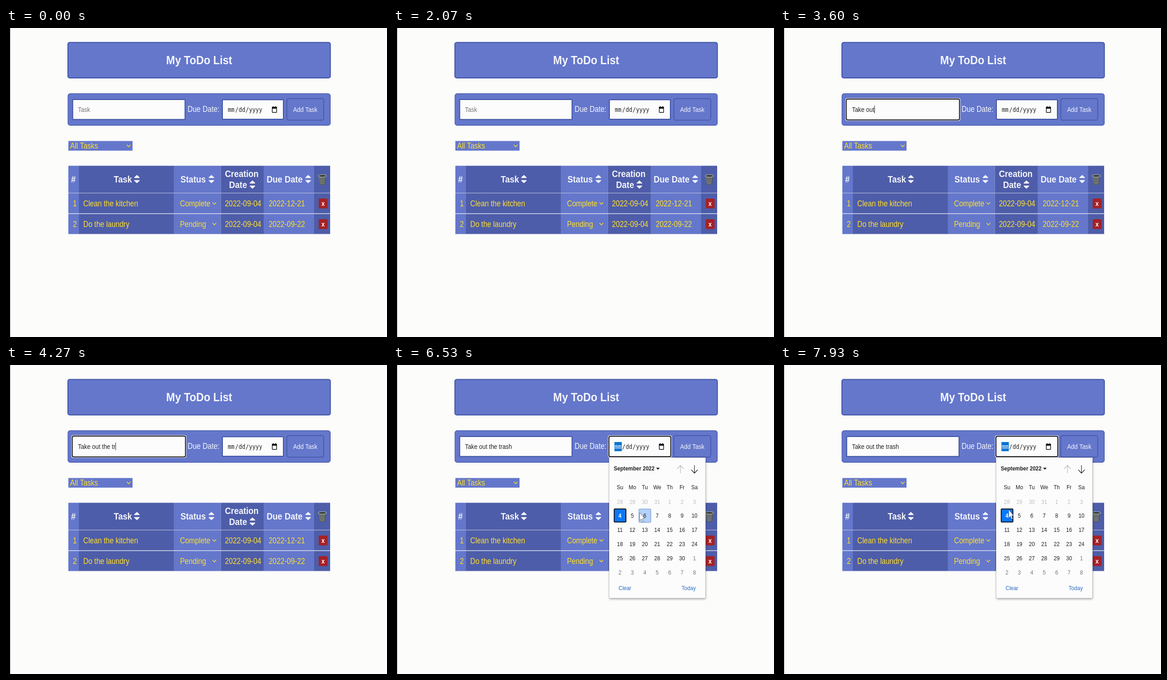
Animation of 831 by 674 pixels, one loop 8000 ms. Source, as an HTML page with a canvas:

```html
<!DOCTYPE html>
<html lang="en">
<head>
<meta charset="utf-8">
<title>My ToDo List</title>
<style>
html, body { margin: 0; width: 100%; height: 100%; overflow: hidden; background: #fcfcfb; }
canvas { display: block; }
</style>
</head>
<body>
<canvas id="stage" width="831" height="674"></canvas>
<script>
const ctx = document.getElementById('stage').getContext('2d');
const LOOP = 8000, SX = 0.967, SY = 1.1; // the page is shown slightly narrow
const LIGHT = '#6477cb', DARK = '#4e5da9', EDGE = '#3f52a5', GOLD = '#ffdf2c', INK = '#202020';
const SANS = '"Liberation Sans", Arial, sans-serif';
const MONO = '"DejaVu Sans Mono", monospace';

const TASK = 'Take out the trash';
const KEYS = [2600, 2730, 2930, 3060, 3130, 3330, 3430, 3530, 3630, 3760,
  3870, 3960, 4060, 4130, 4270, 4400, 4470, 4600];
const FOCUS = 2470, SHOW_CURSOR = 5400, OPEN = 5930;
const PATH = [[5400, 520, 232], [5600, 541, 190], [5860, 586, 178], [6270, 586, 178],
  [6530, 538, 322], [6870, 553, 348], [7200, 530, 345], [7600, 512, 326], [7900, 499, 316]];

function text(s, x, y, size, color, { bold, align = 'left', font = SANS } = {}) {
  ctx.save();
  ctx.translate(x, y);
  ctx.scale(SX, SY);
  ctx.font = `${bold ? 'bold ' : ''}${size}px ${font}`;
  ctx.textAlign = align;
  ctx.fillStyle = color;
  ctx.fillText(s, 0, 0);
  const width = ctx.measureText(s).width * SX;
  ctx.restore();
  return width;
}

function rect(x, y, r, b, color) {
  ctx.fillStyle = color;
  ctx.fillRect(x, y, r - x, b - y);
}

// Rounded box with its border drawn inside the given edges
function box(x, y, r, b, radius, fill, edge, line = 0) {
  const h = line / 2;
  ctx.beginPath();
  ctx.roundRect(x + h, y + h, r - x - line, b - y - line, radius);
  ctx.fillStyle = fill;
  ctx.fill();
  if (line) {
    ctx.strokeStyle = edge;
    ctx.lineWidth = line;
    ctx.stroke();
  }
}

function shape(points, fill) {
  ctx.beginPath();
  points.forEach(([x, y]) => ctx.lineTo(x, y));
  ctx.closePath();
  ctx.fillStyle = fill;
  ctx.fill();
}

function lines(color, width, ...paths) {
  ctx.strokeStyle = color;
  ctx.lineWidth = width;
  ctx.beginPath();
  for (const p of paths) p.forEach(([x, y], i) => i ? ctx.lineTo(x, y) : ctx.moveTo(x, y));
  ctx.stroke();
}

const chevron = (x, y) => lines(GOLD, 1.4, [[x - 4, y - 2.3], [x, y + 2.3], [x + 4, y - 2.3]]);

function sortIcon(x, y) {
  for (const d of [-1, 1])
    shape([[x - 6, y + 2.3 * d], [x + 6, y + 2.3 * d], [x + 5.5, y + 4 * d],
      [x, y + 9 * d], [x - 5.5, y + 4 * d]], '#f4f5fb');
}

function trashCan() {
  shape([[681.5, 323], [698.5, 323], [695.5, 342], [684.5, 342]], '#4b504f');
  const mesh = [];
  for (let i = 0; i < 5; i++) {
    mesh.push([[682.5 + i * 3, 325], [685.5 + i * 2, 341]]);
    mesh.push([[683 + i / 2, 327 + i * 3.2], [697 - i / 2, 327 + i * 3.2]]);
  }
  lines('#8b9290', 0.8, ...mesh);
  ctx.beginPath();
  ctx.ellipse(690, 322.5, 9, 2.7, 0, 0, 7);
  ctx.fillStyle = '#343938';
  ctx.fill();
  ctx.strokeStyle = '#a4aaa8';
  ctx.lineWidth = 1.3;
  ctx.stroke();
}

function inputBox(x, y, r, b, focused) {
  if (focused) {
    box(x - 3, y - 3, r + 3, b + 3, 4, '#f8f9ff');
    box(x - 2, y - 2, r + 2, b + 2, 3, '#fcfcfc', '#101010', 2);
  } else box(x - 1, y - 1, r + 1, b + 1, 1, '#fcfcfc', EDGE, 2);
}

function form(t) {
  box(134.5, 142.5, 708, 213, 5, LIGHT, EDGE, 1.2);
  const typing = t >= FOCUS && t < OPEN;
  inputBox(145.5, 156, 390.5, 199.5, typing);
  const typed = TASK.slice(0, KEYS.filter(k => k <= t).length);
  const w = text(typed || 'Task', 157, 182.5, 13.333, typed ? INK : '#757575');
  if (typing && !(t >= 5100 && t < 5600)) rect(157 + (typed ? w : 0), 169, 158 + (typed ? w : 0), 186, '#222');

  text('Due Date:', 396, 182.5, 16, '#f4f5fb');
  inputBox(472, 156.5, 605, 199, t >= OPEN);
  if (t >= OPEN) rect(483, 168, 499, 188, '#0874d1');
  const part = (s, x, color = INK) => text(s, x, 183, 12.4, color, { font: MONO });
  part('mm', 483.7, t >= OPEN ? '#fff' : INK);
  part('/', 499.8);
  part('dd', 507.5);
  part('/', 522.5);
  part('yyyy', 530);
  box(580, 172, 591, 185, 1, '#fcfcfc', '#111', 1.4);
  rect(580, 172, 591, 176, '#111');
  rect(582, 170.5, 583.5, 173, '#111');
  rect(587.5, 170.5, 589, 173, '#111');

  box(611.5, 153, 694, 202, 4, LIGHT, '#4a5cac', 2);
  text('Add Task', 652.7, 182.5, 13.333, '#f4f5fb', { align: 'center' });
}

function table() {
  const cols = [136, 159, 366, 468.5, 562, 672, 707];
  for (let i = 0; i < 6; i++) rect(cols[i], 300.5, cols[i + 1], 449.5, i % 2 ? DARK : LIGHT);
  rect(136, 359.5, 707, 360.5, '#c9cde6');
  rect(136, 404.2, 707, 405.6, '#e8eaf4');
  rect(136, 449.2, 707, 450.2, '#c9cde6');

  const head = (s, x, y) => text(s, x, y, 18.72, '#f4f5fb', { bold: true });
  head('#', 142, 336.5);
  head('Task', 235, 336.5);
  head('Status', 380.5, 336.5);
  head('Creation', 477.5, 324.5);
  head('Date', 486.5, 348.5);
  head('Due Date', 568.5, 336.5);
  sortIcon(285.5, 329.5);
  sortIcon(448, 329.5);
  sortIcon(537.5, 341.5);
  sortIcon(659, 329.5);
  trashCan();

  [['1', 'Clean the kitchen', 'Complete', '2022-12-21'],
   ['2', 'Do the laundry', 'Pending', '2022-09-22']].forEach(([n, task, status, due], i) => {
    const y = 388.5 + i * 45;
    text(n, 145.7, y, 16, GOLD);
    text(task, 168.5, y, 16, GOLD);
    text(status, 379.5, y, 16, GOLD);
    chevron(454.5, y - 6);
    text('2022-09-04', 477.5, y, 16, GOLD);
    text(due, 573, y, 16, GOLD);
    box(682, y - 16.5, 701.5, y + 5, 2, '#a52126');
    text('x', 691.7, y - 0.5, 13.333, '#fff', { bold: true, align: 'center' });
  });
}

function suggestion(t) {
  if (t < KEYS[0] || t >= 2930) return;
  ctx.save();
  ctx.globalAlpha = Math.min(1, Math.max(0, (2870 - t) / 140));
  ctx.shadowColor = 'rgba(0,0,0,.4)';
  ctx.shadowBlur = 4;
  box(240, 212, 319, 258, 4, '#454545');
  ctx.shadowBlur = 0;
  shape([[253, 212], [260, 204.5], [267, 212]], '#454545');
  ctx.globalAlpha = Math.min(1, ctx.globalAlpha * 1.8);
  text('TESTing', 251.5, 240.5, 12, '#fff', { font: '"Open Sans", sans-serif' });
  ctx.restore();
}

function calendar(mx, my) {
  ctx.save();
  ctx.shadowColor = 'rgba(0,0,0,.45)';
  ctx.shadowBlur = 5;
  ctx.shadowOffsetY = 1;
  rect(471.5, 202, 681.5, 508.5, '#fcfcfc');
  ctx.restore();
  lines('#c6c6c6', 0.8, [[471.5, 202], [471.5, 508.5], [681.5, 508.5], [681.5, 202]]);

  text('September 2022', 481.5, 230, 12, INK, { bold: true });
  shape([[574, 224], [581.5, 224], [577.8, 228.5]], INK);
  lines('#b8b8b8', 1.2, [[627, 219], [627, 236]], [[620, 226.5], [627, 219], [634, 226.5]]);
  lines('#222', 1.2, [[657.5, 218.5], [657.5, 236]], [[650.5, 228.5], [657.5, 236], [664.5, 228.5]]);

  const center = { align: 'center' };
  const col = c => 495 + 27.1 * c;
  ['Su', 'Mo', 'Tu', 'We', 'Th', 'Fr', 'Sa'].forEach((d, c) => text(d, col(c), 271, 12, INK, center));

  const hoverCol = Math.floor((mx - 481.5) / 27.1), hoverRow = Math.floor((my - 282.6) / 30.8);
  for (let i = 0; i < 42; i++) {
    const c = i % 7, r = Math.floor(i / 7), x = col(c), y = 298 + 30.8 * r;
    const day = i - 3, today = day === 4;
    const label = day < 1 ? day + 31 : day > 30 ? day - 30 : day;
    if (today) box(481.5, 313, 509, 343.5, 1.5, '#0a78fb', '#101318', 2);
    else if (day > 4 && c === hoverCol && r === hoverRow)
      box(x - 13.5, y - 15.3, x + 13.7, y + 15, 1.5, '#b3d2fa', '#6c8fb9', 1);
    const color = today ? '#fff' : day < 4 ? '#bdbdbd' : day > 30 ? '#767676' : INK;
    text(label, x, y + 4.6, 12, color, { align: 'center', bold: today });
  }
  text('Clear', 492, 491, 12, '#2a6bc0');
  text('Today', 629.5, 491, 12, '#2a6bc0');
}

function cursorAt(t) {
  const i = PATH.findIndex(p => p[0] > t);
  if (i < 0) return PATH[PATH.length - 1].slice(1);
  if (!i) return PATH[0].slice(1);
  const [t0, x0, y0] = PATH[i - 1], [t1, x1, y1] = PATH[i];
  const u = (t - t0) / (t1 - t0), e = u * u * (3 - 2 * u);
  return [x0 + (x1 - x0) * e, y0 + (y1 - y0) * e];
}

function cursor(x, y) {
  const arrow = [[0, 0], [0, 17.5], [3.6, 13.8], [6.2, 20], [8.6, 19], [6, 13], [10.5, 12.6]];
  shape(arrow.map(([a, b]) => [x + a, y + b]), '#fff');
  ctx.strokeStyle = '#5a5f70';
  ctx.lineWidth = 0.8;
  ctx.stroke();
}

function draw(now) {
  const t = now % LOOP;
  rect(0, 0, 831, 674, '#fcfcfb');
  rect(0, 0, 9, 674, '#000');
  box(134, 30.5, 708.5, 110, 4, LIGHT, EDGE, 2);
  text('My ToDo List', 421.3, 79, 24, '#f4f5fb', { bold: true, align: 'center' });
  form(t);
  rect(136, 246.5, 276, 267.5, LIGHT);
  text('All Tasks', 139.7, 263, 16, GOLD);
  chevron(267.5, 257);
  table();
  suggestion(t);
  const [x, y] = cursorAt(t);
  if (t >= OPEN) calendar(x, y);
  if (t >= SHOW_CURSOR) cursor(x, y);
  requestAnimationFrame(draw);
}
requestAnimationFrame(draw);
</script>
</body>
</html>
```
